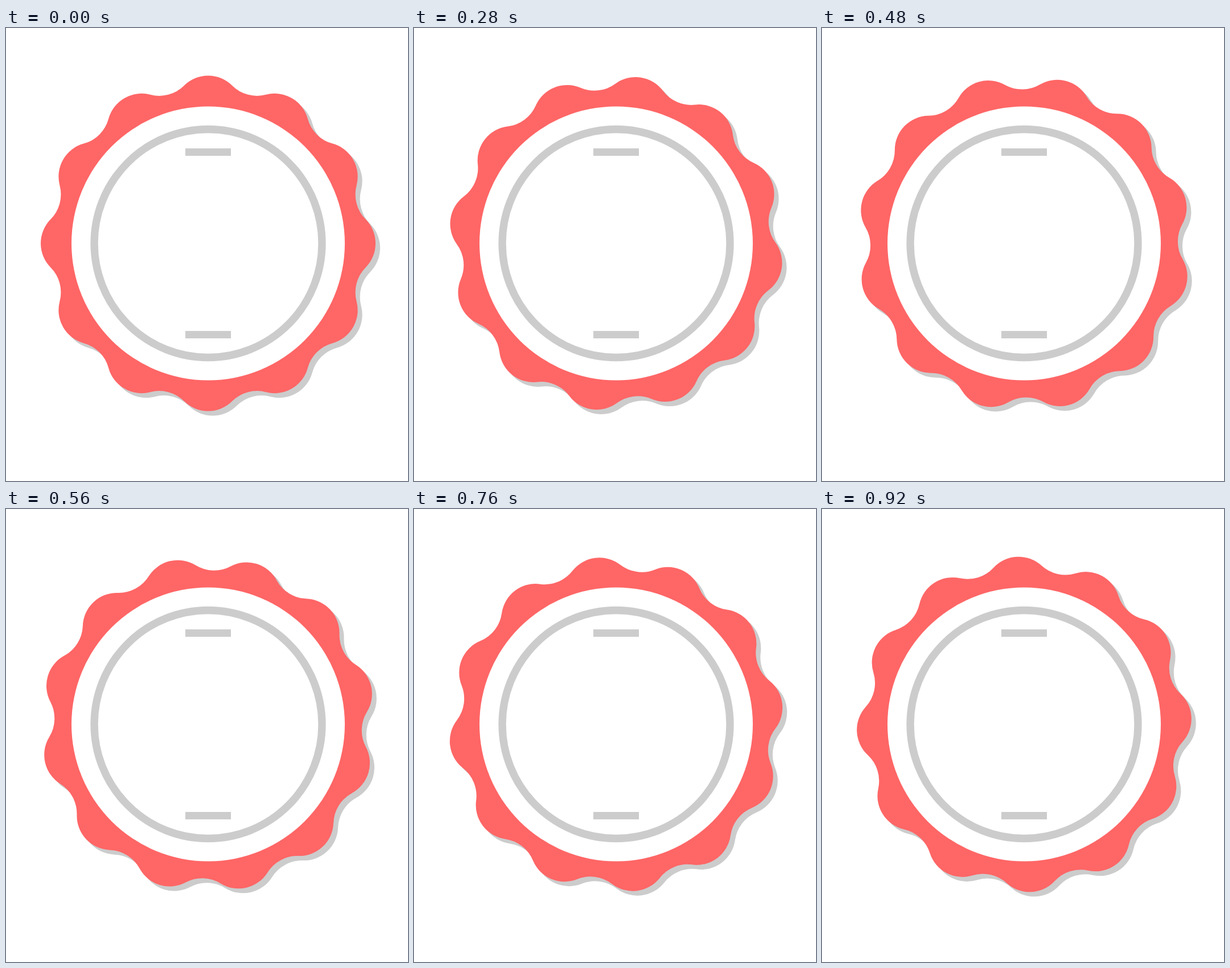
Animation of 706x794 px, one loop 0.96 s. Source, as an HTML page:

```html
<!DOCTYPE html>
<html lang="en">
<head>
<meta charset="utf-8">
<title>Rotating badge</title>
<style>
  html, body { margin: 0; width: 100%; height: 100%; overflow: hidden; background: #fff; }
  svg { display: block; width: 100%; height: 100%; }
</style>
</head>
<body>
<svg viewBox="0 0 706 794">
  <g transform="translate(355 377.5)">
    <g transform="translate(8 8)"><path class="seal" fill="#ccc"/></g>
    <path class="seal" fill="#f66"/>
    <circle r="240" fill="#fff"/>
    <circle r="200" fill="none" stroke="#ccc" stroke-width="13.3"/>
    <path d="M-40 -160H40M-40 160H40" stroke="#ccc" stroke-width="13"/>
  </g>
</svg>
<script>
  const PETALS = 12, ORBIT = 234, BUMP = 60, DIP = 62;
  const LOOP = 960, STEP = 40, SPEED = 0.03; // ms, ms, degrees per ms

  // Outline of convex bumps joined by tangent concave arcs.
  function outline() {
    const half = Math.PI / PETALS;
    const across = ORBIT * Math.sin(half);
    const along = Math.sqrt((BUMP + DIP) ** 2 - across ** 2);
    const share = BUMP / (BUMP + DIP);
    const x = across * (1 - share);
    const y = ORBIT * Math.cos(half) + along * share;
    const radius = Math.hypot(x, y);
    const spread = half - Math.atan2(x, y);
    const point = a =>
      `${(radius * Math.sin(a)).toFixed(2)} ${(-radius * Math.cos(a)).toFixed(2)}`;

    let d = `M${point(-spread)}`;
    for (let i = 0; i < PETALS; i++) {
      const a = 2 * half * i;
      d += `A${BUMP} ${BUMP} 0 0 1 ${point(a + spread)}`;
      d += `A${DIP} ${DIP} 0 0 0 ${point(a + 2 * half - spread)}`;
    }
    return d + 'Z';
  }

  const seals = document.querySelectorAll('.seal');
  const shape = outline();
  seals.forEach(s => s.setAttribute('d', shape));

  function draw(time) {
    const t = Math.floor((time % LOOP) / STEP) * STEP;
    seals.forEach(s => s.setAttribute('transform', `rotate(${t * SPEED})`));
  }

  let start;
  function tick(now) {
    start ??= now;
    draw(now - start);
    requestAnimationFrame(tick);
  }
  draw(0);
  requestAnimationFrame(tick);
</script>
</body>
</html>
```
